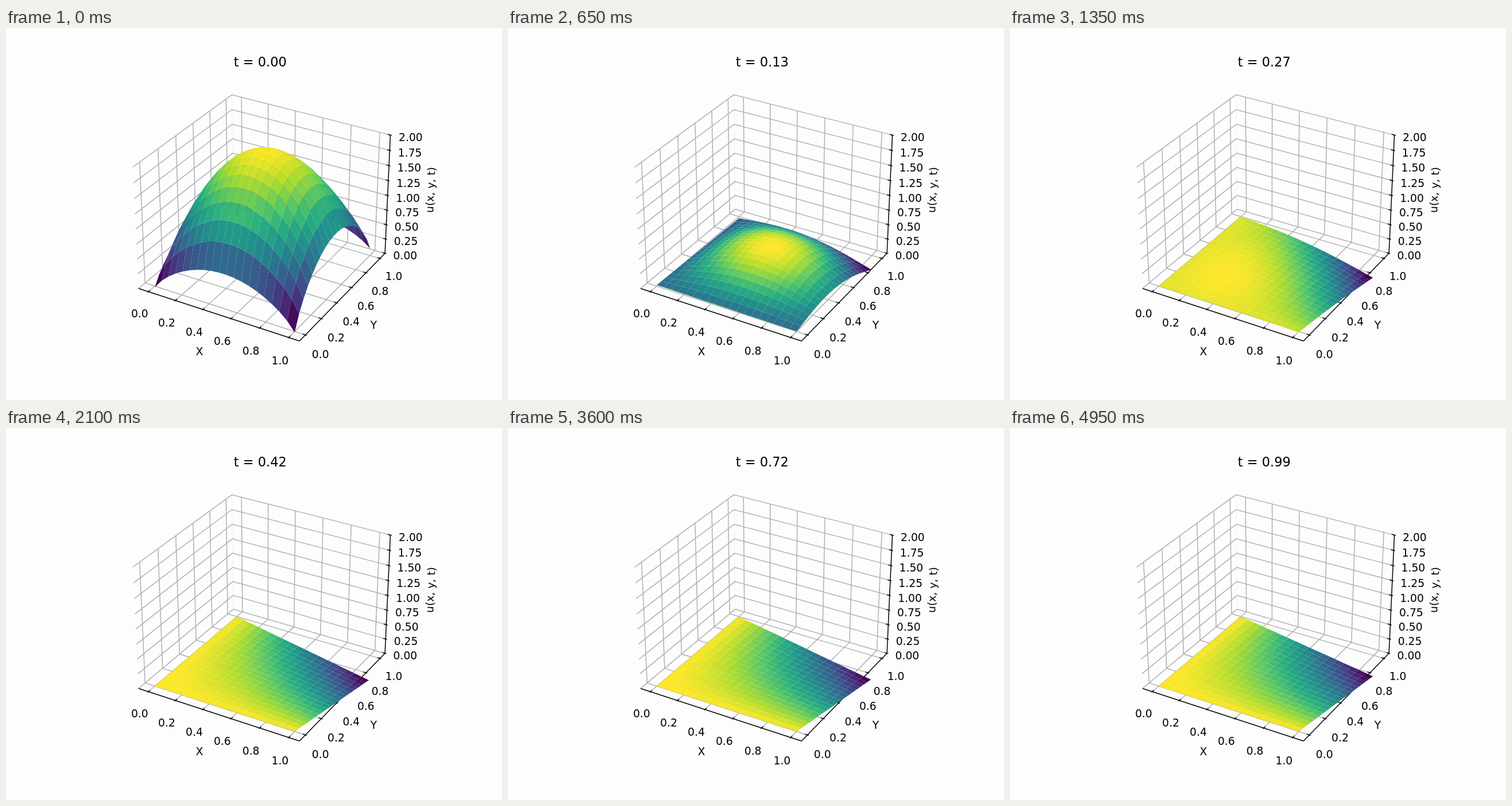
An HTML page with a canvas that plays this animation: 864 by 648 pixels, repeating every 5 s.

```html
<!DOCTYPE html>
<html lang="en">
<head>
<meta charset="utf-8">
<title>Surface over time</title>
<style>
  html, body { margin: 0; width: 100%; height: 100%; overflow: hidden; background: #fdfdfd; }
  canvas { display: block; }
</style>
</head>
<body>
<canvas id="stage" width="864" height="648"></canvas>
<script>
const ctx = document.getElementById('stage').getContext('2d');
const STEP = 50, STEPS = 100, CELLS = 19;
const LO = -0.0729167, HI = 1.0729167, SPAN = HI - LO;
const ticks = [0, 0.2, 0.4, 0.6, 0.8, 1];
const zTicks = Array.from({ length: 9 }, (_, i) => i / 4);

// Perspective camera: elevation 30, azimuth -60, distance 10
const BOX = 25 / 21, TALL = BOX * 0.75, S3 = Math.sqrt(3);
function project(x, y, z) {
  const a = ((x - LO) / SPAN - 0.5) * BOX;
  const b = ((y - LO) / SPAN - 0.5) * BOX;
  const c = (z / 2 - 0.5) * TALL;
  const depth = 10 - (a * S3 / 4 - b * 0.75 + c / 2);
  const k = 2697.1 / depth;
  return [
    449.5 + k * (a * S3 / 2 + b / 2),
    320.5 - k * (-a / 4 + b * S3 / 4 + c * S3 / 2),
    depth
  ];
}

// t, four corner heights (00, 10, 01, 11), edge arches (left, right, front, back), dome, skew
const keys = [
  [0, -0.02, -0.015, 0, 0.12, 0.6, 0.92, 0.6, 0.4, 0.76, 0.45],
  [0.03, 0.02, -0.13, -0.05, 0, 0.22, 0.68, 0.22, 0.25, 0.88, 0.1],
  [0.07, 0.055, -0.04, -0.07, -0.135, 0, 0.45, -0.02, 0.12, 0.74, -0.3],
  [0.13, 0.02, 0, -0.03, -0.25, 0, 0.2, 0, 0.16, 0.28, -0.1],
  [0.19, -0.01, 0.005, 0, -0.325, 0, 0.05, 0, 0.17, 0.075, 0],
  [0.27, 0, -0.015, 0, -0.395, 0, 0.02, 0.01, 0.07, 0.04, 0],
  [0.42, 0, 0, 0, -0.44, 0, 0, 0, 0, 0.015, 0],
  [0.72, 0, 0, 0, -0.43, 0, 0, 0, 0, 0, 0],
  [0.99, 0, 0, 0, -0.37, 0, 0, 0, 0, 0, 0]
];

function slope(i, col) {
  const p = keys[Math.max(i - 1, 0)], n = keys[Math.min(i + 1, keys.length - 1)];
  return (n[col] - p[col]) / (n[0] - p[0]);
}

// Cubic Hermite blend of the key rows
function shapeAt(t) {
  let i = 0;
  while (i < keys.length - 2 && t >= keys[i + 1][0]) i++;
  const p = keys[i], n = keys[i + 1], h = n[0] - p[0];
  const s = (t - p[0]) / h, s2 = s * s, s3 = s2 * s;
  return p.map((v, col) =>
    v * (2 * s3 - 3 * s2 + 1) + n[col] * (3 * s2 - 2 * s3) +
    h * (slope(i, col) * (s3 - 2 * s2 + s) + slope(i + 1, col) * (s3 - s2)));
}

function heightField(t) {
  const [, c00, c10, c01, c11, left, right, front, back, dome, skew] = shapeAt(t);
  const power = Math.min(0.85 + 4 * t, 1.15);
  const arch = s => Math.pow(Math.max(4 * s * (1 - s), 0), power);
  return (x, y) => {
    const ax = arch(x), ay = arch(y), p = 1 - x, q = 1 - y;
    return c00 * p * q + c10 * x * q + c01 * p * y + c11 * x * y +
      (left * p + right * x) * ay + (front * q + back * y) * ax +
      (dome + skew * (0.5 - y)) * ax * ay;
  };
}

const viridis = ['440154', '472d7b', '3b528b', '2c728e', '21918c', '28ae80', '5ec962', 'addc30', 'fde725']
  .map(h => [0, 2, 4].map(i => parseInt(h.slice(i, i + 2), 16)));
function color(v) {
  const p = Math.min(Math.max(v, 0), 1) * 8, i = Math.min(Math.floor(p), 7);
  const rgb = viridis[i].map((c, k) => Math.round(c + (viridis[i + 1][k] - c) * (p - i)));
  return `rgb(${rgb})`;
}

function line(stroke, ...points) {
  ctx.strokeStyle = stroke;
  ctx.beginPath();
  points.forEach(p => { const [x, y] = project(...p); ctx.lineTo(x, y); });
  ctx.stroke();
}

function label(str, x, y, size = 18.75) {
  ctx.font = `${size}px "DejaVu Sans", sans-serif`;
  ctx.fillText(str, x, y + size * 0.365);
}

function drawAxes() {
  const grid = '#b0b0b0', ink = '#000';
  ctx.lineWidth = 1.5;
  line('#f3f3f3', [LO, HI, 0], [LO, HI, 2]);
  for (const v of ticks) {
    line(grid, [v, LO, 0], [v, HI, 0], [v, HI, 2]);
    line(grid, [HI, v, 0], [LO, v, 0], [LO, v, 2]);
  }
  for (const z of zTicks) line(grid, [LO, LO, z], [LO, HI, z], [HI, HI, z]);

  line(ink, [LO, LO, 0], [HI, LO, 0]);
  line(ink, [HI, LO, 0], [HI, HI, 0]);
  line(ink, [HI, HI, 0], [HI, HI, 2]);

  const inner = 0.016 * SPAN, outer = 0.008 * SPAN, away = 0.0905 * SPAN, drop = -0.239;
  ctx.fillStyle = ink;
  ctx.textAlign = 'center';
  for (const v of ticks) {
    line(ink, [v, LO + inner, 0], [v, LO - outer, 0]);
    line(ink, [HI - inner, v, 0], [HI + outer, v, 0]);
    const [xx, xy] = project(v, LO - away, drop);
    label(v.toFixed(1), xx, xy);
    const [yx, yy] = project(HI + away, v, drop);
    label(v.toFixed(1), yx, yy);
  }
  for (const z of zTicks) {
    line(ink, [HI - inner, HI, z], [HI + outer, HI, z]);
    const [x, y] = project(HI, HI, z);
    label(z.toFixed(2), x + 35.3, y + 4);
  }
  label('X', 337, 563);
  label('Y', 640.5, 517);
  ctx.save();
  ctx.translate(739, 282);
  ctx.rotate(-87.2 * Math.PI / 180);
  label('u(x, y, t)', 0, 0);
  ctx.restore();
}

function drawSurface(t) {
  const u = heightField(t);
  const nodes = [];
  for (let j = 0; j <= CELLS; j++) {
    for (let i = 0; i <= CELLS; i++) {
      const x = i / CELLS, y = j / CELLS, z = u(x, y);
      nodes.push({ z, p: project(x, y, z) });
    }
  }
  const mean = (quad, get) => quad.reduce((sum, n) => sum + get(n), 0) / 4;
  const faces = [];
  for (let j = 0; j < CELLS; j++) {
    for (let i = 0; i < CELLS; i++) {
      const k = j * (CELLS + 1) + i;
      const quad = [k, k + 1, k + CELLS + 2, k + CELLS + 1].map(n => nodes[n]);
      faces.push({ quad, z: mean(quad, n => n.z), depth: mean(quad, n => n.p[2]) });
    }
  }
  const zs = faces.map(f => f.z), min = Math.min(...zs), max = Math.max(...zs);
  faces.sort((a, b) => b.depth - a.depth);
  for (const f of faces) {
    ctx.fillStyle = color((f.z - min) / (max - min));
    ctx.beginPath();
    f.quad.forEach(n => ctx.lineTo(n.p[0], n.p[1]));
    ctx.fill();
  }
}

let shown = -1;
function render(now) {
  const step = Math.floor(now / STEP) % STEPS;
  if (step !== shown) {
    shown = step;
    const t = step / STEPS;
    ctx.fillStyle = '#fdfdfd';
    ctx.fillRect(0, 0, 864, 648);
    drawAxes();
    label(`t = ${t.toFixed(2)}`, 442.8, 59, 22.5);
    drawSurface(t);
  }
  requestAnimationFrame(render);
}
render(performance.now());
</script>
</body>
</html>
```
